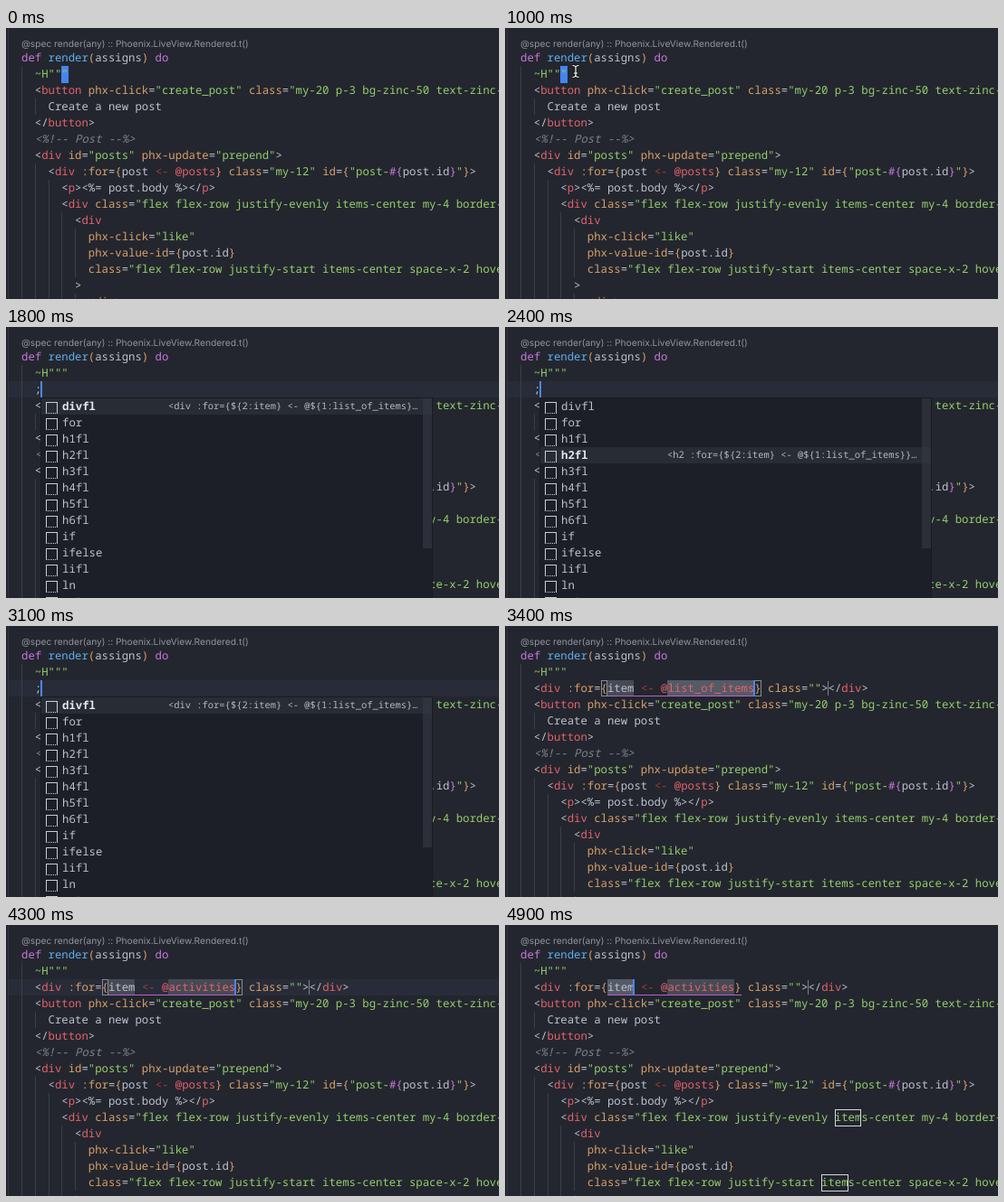
An HTML page that plays this animation: 544x300 px, repeating every 5000 ms.

```html
<!DOCTYPE html>
<html lang="en">
<head>
<meta charset="utf-8">
<title>Snippet completion</title>
<style>
html, body { margin: 0; width: 100%; height: 100%; overflow: hidden; background: #23262e; }
#stage { position: relative; width: 544px; height: 300px; overflow: hidden; color: #bcc2cd;
  font: 500 12.3px/18px "Noto Sans Mono", monospace; text-rendering: geometricPrecision; font-variant-ligatures: none; }
#stage > *, #menu > * { position: absolute; }
pre { margin: 0; left: 17px; height: 18px; font: inherit; white-space: pre; }
.spec { left: 17px; top: 9px; font: 10.2px/18px Inter, sans-serif; color: #9095a0; white-space: pre; }
.edge { left: 2px; top: 0; width: 1px; height: 300px; background: #30343c; }
.active { width: 544px; height: 18px; background: #282c38; }
.guide { left: 17px; height: 18px; background: repeating-linear-gradient(90deg, #3a3e47 0 1px, transparent 1px 14.76px); }
.m { color: #c678dd } .b { color: #61afef } .o { color: #d9a06a } .r { color: #e4626c }
.g { color: #96cd6e } .d { color: #a83a3a } .c { color: #7d828c; font-style: italic } .w { color: #bcc2cd }
.box { box-sizing: border-box; }
.block { background: #4684ee; }
.fill { background: #454a55; }
.pick { background: #545a66; }
.pair { border: 1px solid #858a94; }
.same { border: 1px solid #d4d7dc; }
.caret { width: 2px; height: 18px; background: #4c86f5; }
.stop { width: 1px; height: 16px; background: #7c818b; }
.wave { height: 1px; background: #b95fd0; }
#menu { left: 39px; top: 79px; width: 431px; height: 230px; background: #1c1f27; box-shadow: 0 0 0 1px #181b21; overflow: hidden; }
#menu .row { left: 0; width: 431px; height: 18px; white-space: pre; }
#menu .on { background: #272c35; color: #e4e7ec; }
.row i { position: absolute; left: 5px; top: 4px; width: 11px; height: 11px; border: 1px solid #c9ccd3; border-bottom-style: dotted; }
.row b { position: absolute; left: 23px; font-weight: 500; }
.on b { font-weight: 600; }
.row small { position: absolute; left: 140px; font-size: 10.45px; color: #b4b9c3; }
.bar { left: 421px; top: 0; width: 10px; height: 166px; background: #343842aa; }
</style>
</head>
<body>
<div id="stage"></div>
<script>
const PITCH = 7.38, LINE = 18, LEFT = 17, TOP = 24;
const stage = document.getElementById('stage');

// "¦x" switches the colour class to x
const head = ['¦mdef ¦brender¦o(¦wassigns¦o) ¦mdo', '  ¦g~H"""'];
const body = [
  '  ¦w<¦rbutton ¦ophx-click¦w=¦g"create_post" ¦oclass¦w=¦g"my-20 p-3 bg-zinc-50 text-zinc-900"',
  '    ¦wCreate a new post',
  '  ¦w</¦rbutton¦w>',
  '  ¦c<%!-- Post --%>',
  '  ¦w<¦rdiv ¦oid¦w=¦g"posts" ¦ophx-update¦w=¦g"prepend"¦w>',
  '    ¦w<¦rdiv ¦o:for¦w=¦o{¦wpost ¦d<- ¦r@posts¦o} ¦oclass¦w=¦g"my-12" ¦oid¦w=¦o{¦g"post-¦m#{¦wpost.id¦m}¦g"¦o}¦w>',
  '      ¦w<¦rp¦w><%= post.body %></¦rp¦w>',
  '      ¦w<¦rdiv ¦oclass¦w=¦g"flex flex-row justify-evenly items-center my-4 border-b"',
  '        ¦w<¦rdiv',
  '          ¦ophx-click¦w=¦g"like"',
  '          ¦ophx-value-id¦w=¦o{¦wpost.id¦o}',
  '          ¦oclass¦w=¦g"flex flex-row justify-start items-center space-x-2 hover:"',
  '        ¦w>',
  '          ¦w<¦rdiv¦w>'
];
const snippets = ['divfl', 'for', 'h1fl', 'h2fl', 'h3fl', 'h4fl', 'h5fl', 'h6fl', 'if', 'ifelse', 'lifl', 'ln', 'opt'];
const details = [
  '<div :for={${2:item} <- @${1:list_of_items}…',
  '<%= for ${2:item} <- @${1:list_of_items} do…',
  '<h1 :for={${2:item} <- @${1:list_of_items}}…',
  '<h2 :for={${2:item} <- @${1:list_of_items}}…'
];

const esc = s => s.replace(/&/g, '&amp;').replace(/</g, '&lt;');
const colX = c => LEFT + c * PITCH;
const rowY = r => TOP + r * LINE;
const div = (cls, x, y, w = '', h = '') =>
  `<div class="${cls}" style="left:${x}px;top:${y}px;${w && `width:${w}px;`}${h && `height:${h}px`}"></div>`;
const box = (cls, col, row, n, h = LINE) => div('box ' + cls, colX(col), rowY(row), n * PITCH, h);
const caret = (col, row) => div('caret', colX(col) - 1, rowY(row));
const active = row => div('active', 3, rowY(row));

// value of the last step whose start time has passed
const at = (t, steps) => steps.reduce((v, [start, next]) => t >= start ? next : v, steps[0][1]);

function codeLine(src, row) {
  const [indent, ...runs] = src.split('¦');
  const guide = indent ? `<div class="guide" style="top:${rowY(row)}px;width:${indent.length * PITCH - 2}px"></div>` : '';
  const spans = runs.map(s => `<span class="${s[0]}">${esc(s.slice(1))}</span>`).join('');
  return `${guide}<pre style="top:${rowY(row)}px">${indent}${spans}</pre>`;
}

function menu(selected) {
  const rows = snippets.map((name, i) =>
    `<div class="row ${i === selected ? 'on' : ''}" style="top:${i * LINE}px"><i></i><b>${name}</b>` +
    (i === selected ? `<small>${esc(details[i])}</small>` : '') + '</div>');
  return `<div id="menu">${rows.join('')}<div class="bar"></div></div>`;
}

function pointer(t) {
  const k = Math.min(1, (t - 700) / 300), x = 64 + 14 * k * (2 - k);
  const d = 'M-3.5-6.5Q0-6.5 0-4V4Q0 6.5-3.5 6.5M3.5-6.5Q0-6.5 0-4M0 4Q0 6.5 3.5 6.5M-2 2H2';
  return `<svg width="20" height="24" viewBox="-10 -12 20 24" fill="none" style="left:${x - 10}px;top:36px">
    <path d="${d}" stroke="#111" stroke-width="3"/><path d="${d}" stroke="#fff" stroke-width="1.2"/></svg>`;
}

function scene(t) {
  const lines = [...head];
  let under = '', over = '';
  if (t < 1300) {
    if (t < 1200) under = box('block', 6, 1, 1, 19);
    else over = caret(7, 1);
    if (t >= 700) over += pointer(t);
  } else if (t < 3200) {
    const typed = t >= 1500;
    lines.push(typed ? '  ¦w;' : '  ');
    under = active(2);
    over = caret(typed ? 3 : 2, 2);
    if (t >= 1600) over += menu(at(t, [[0, 0], [2000, 1], [2100, 2], [2200, 3], [2500, 2], [2600, 1], [2700, 0]]));
  } else {
    const count = at(t, [[0, 0], [3500, 1], [3700, 2], [3800, 3], [3900, 4], [4000, 6], [4100, 7], [4200, 9], [4300, 10]]);
    const list = count ? 'activities'.slice(0, count) : 'list_of_items';
    const end = 22 + list.length, onItem = t >= 4500;
    lines.push(`  ¦w<¦rdiv ¦o:for¦w=¦o{¦witem ¦d<- ¦r@${list}¦o} ¦oclass¦w=¦g""¦w></¦rdiv¦w>`);
    if (count && !onItem) under = active(2);
    under += box(onItem ? 'pick' : 'fill', 13, 2, 4) + box(count ? 'fill' : 'pick', 22, 2, list.length);
    over = div('wave', colX(13), 77, (end - 12) * PITCH) + div('stop', colX(end + 11), 61);
    if (onItem) over += caret(17, 2);
    else over += box('pair', 12, 2, 1) + box('pair', end, 2, 1) + caret(end, 2);
    if (t >= 4700) over += box('same', 47, 10, 4, 19) + box('same', 45, 14, 4, 19);
  }
  lines.push(...body);
  return '<div class="edge"></div><div class="spec">@spec render(any) :: Phoenix.LiveView.Rendered.t()</div>' +
    under + lines.map(codeLine).join('') + over;
}

const start = performance.now();
let shown = '';
function draw() {
  const t = Math.floor((performance.now() - start) % 5000 / 100) * 100;
  const html = scene(t);
  if (html !== shown) stage.innerHTML = shown = html;
  requestAnimationFrame(draw);
}
draw();
</script>
</body>
</html>
```
